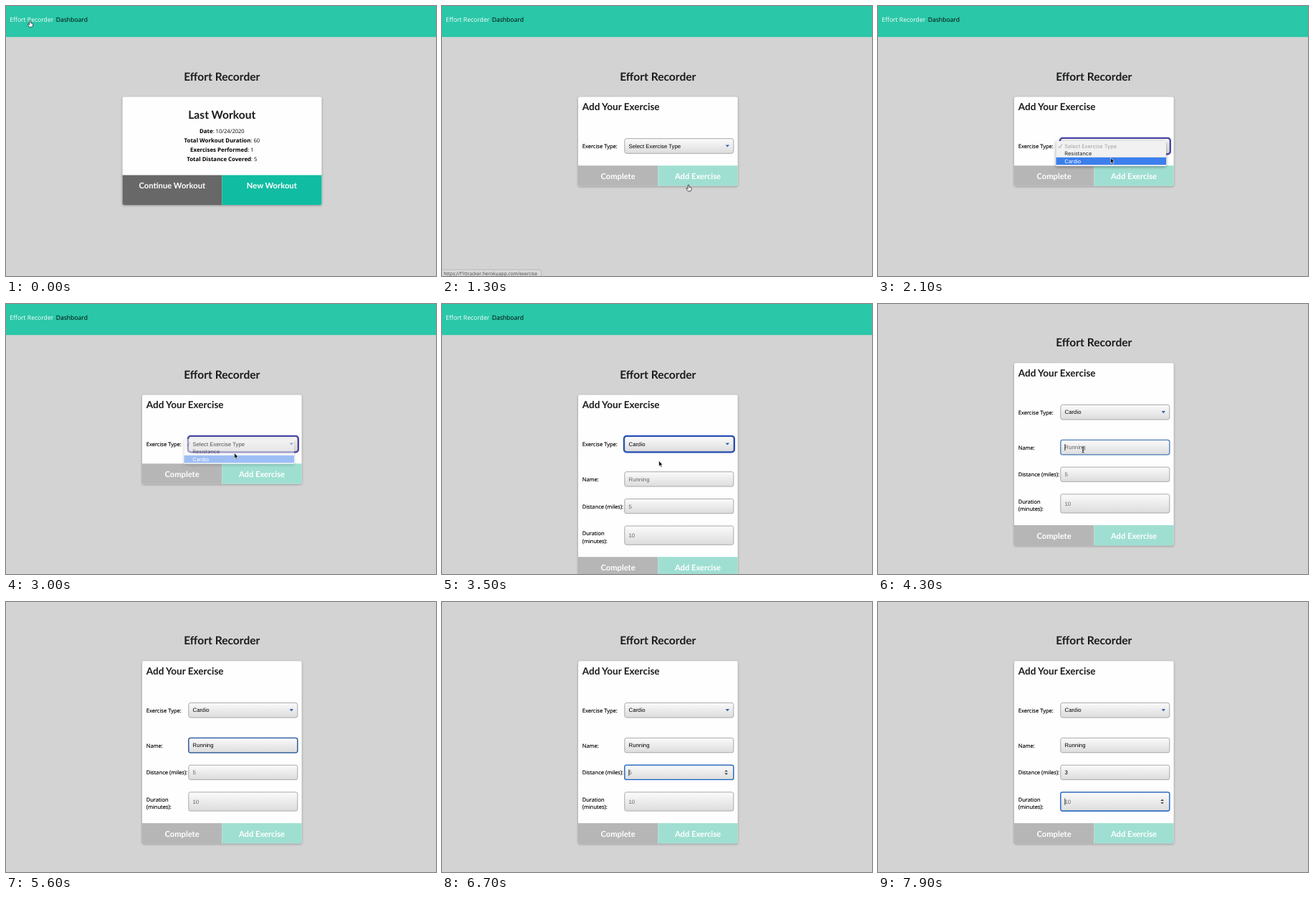
Write an HTML page that moves like this. It is 600 px wide and 376 px high and loops after 8 s.

```html
<!DOCTYPE html>
<html lang="en">
<head>
<meta charset="utf-8">
<title>Workout form</title>
<style>
html, body { margin: 0; width: 100%; height: 100%; overflow: hidden; background: #d3d3d3; }
svg { display: block; width: 600px; height: 376px; text-rendering: geometricPrecision; }
text { font: 7.55px "Open Sans", "Noto Sans", sans-serif; fill: #000; white-space: pre; }
.label { stroke: #000; stroke-width: .15; }
.mid { text-anchor: middle; }
.nav { font-size: 8.6px; }
.head { font: 700 15.6px Lato, sans-serif; fill: #1b1c1d; }
.sub { font-size: 13.55px; }
.btn { font: 700 11.2px Lato, sans-serif; fill: #fff; text-anchor: middle; }
.input { font: 7.8px "Liberation Sans", Arial, sans-serif; fill: #000; }
.input.hint { fill: #666; }
.menu { font: 7.4px Inter, "Liberation Sans", sans-serif; fill: #222; }
.status { font-size: 6.65px; fill: #444; }
.strong { font-weight: 700; font-size: 7.9px; }
.card { fill: #fefefe; filter: drop-shadow(0 1px 1.5px #0005); }
.field { fill: url(#shade); stroke: #a9a9a9; }
.ring { fill: none; }
</style>
</head>
<body>
<svg viewBox="0 0 600 376">
  <defs>
    <linearGradient id="shade" x2="0" y2="1">
      <stop stop-color="#fbfbfb"/><stop offset="1" stop-color="#dcdcdc"/>
    </linearGradient>
  </defs>
  <rect width="600" height="376" fill="#d3d3d3"/>
  <g id="page">
    <rect width="600" height="43.2" fill="#2ac7a8"/>
    <text class="nav" x="5.3" y="22.3" style="fill:#fff">Effort Recorder</text>
    <text class="nav" x="69.7" y="22.3">Dashboard</text>
    <text class="head mid" x="301.3" y="103.7">Effort Recorder</text>

    <g id="home">
      <rect class="card" x="162.5" y="126.5" width="278" height="150.5" rx="2.5"/>
      <text class="head mid" x="301.3" y="156.7">Last Workout</text>
      <g id="stats"></g>
      <path d="M162.5 235.5H301.3V277H165q-2.5 0-2.5-2.5z" fill="#686868"/>
      <path d="M301.3 235.5H440.5V274.5q0 2.5-2.5 2.5H301.3z" fill="#10bda2"/>
      <text class="btn" x="231.8" y="254.3">Continue Workout</text>
      <text class="btn" x="370.8" y="254.3">New Workout</text>
    </g>

    <g id="form">
      <rect id="sheet" class="card" x="190" y="126.5" width="222.7" height="124" rx="2.5"/>
      <text class="head sub" x="195.7" y="145.3">Add Your Exercise</text>
      <text class="label" x="195.7" y="198.2">Exercise Type:</text>
      <rect class="field" x="254.8" y="184.7" width="152" height="20.6" rx="3"/>
      <text id="choice" class="input" x="260.5" y="197.6"></text>
      <path d="M395.6 193.4h5.4l-2.7 3.2z" fill="#2b62b0"/>
      <rect id="selectRing" class="ring" x="253.9" y="183.9" width="154" height="22.4" rx="3.5" stroke-width="2.2"/>
      <g id="cardio">
        <text class="label" x="195.7" y="247">Name:</text>
        <text class="label" x="195.7" y="284.8">Distance (miles):</text>
        <text class="label" x="195.7" y="322.3">Duration</text>
        <text class="label" x="195.7" y="332.8">(minutes):</text>
        <g id="fields"></g>
      </g>
      <g id="buttons">
        <path d="M190 222.2H301.4V250.5H192.5q-2.5 0-2.5-2.5z" fill="#b6b6b6"/>
        <path d="M301.4 222.2H412.7V248q0 2.5-2.5 2.5H301.4z" fill="#9fdfd2"/>
        <text class="btn" x="245.6" y="241.2">Complete</text>
        <text class="btn" x="357" y="241.2">Add Exercise</text>
      </g>
      <g id="menu">
        <rect x="248.5" y="188" width="153.5" height="35" rx="1" fill="#f1f1f1" style="filter:drop-shadow(0 1.5px 2px #0006)"/>
        <rect x="248.5" y="210.8" width="153.5" height="10.4" fill="#3c7fec"/>
        <path d="M251.8 195.4l1.8 2.2 3.2-5" fill="none" stroke="#999" stroke-width=".9"/>
        <text class="menu" x="260.3" y="197.8" style="fill:#a2a2a2">Select Exercise Type</text>
        <text class="menu" x="260.3" y="208.3">Resistance</text>
        <text class="menu" x="260.3" y="218.8" style="fill:#fff">Cardio</text>
      </g>
    </g>
  </g>
  <g id="status">
    <path d="M-1 377V367.2H136q2.5 0 2.5 2.5V377z" fill="#dadada" stroke="#b4b4b4" stroke-width=".8"/>
    <text class="status" x="2.3" y="374.6">https://f1ttracker.herokuapp.com/exercise</text>
  </g>
  <g id="pointer">
    <path id="hand" fill="#fff" stroke="#222" stroke-width=".8" d="M-.9.8a.9.9 0 0 1 1.8 0V3.2l2.5.6q1 .3.8 1.3l-.5 2.8q-.2.9-1 .9H-.4q-.6 0-1-.6L-3.1 5.6q-.4-.9.4-1.1.6-.1 1 .5l.8.8z"/>
    <path id="arrow" fill="#000" stroke="#fff" stroke-width=".6" d="M0 0V7.6L1.7 6 2.9 8.8 4.2 8.2 3 5.5H5.4z"/>
    <path id="beam" fill="none" stroke="#222" stroke-width=".9" d="M-1.6-4Q0-4 0-3Q0-4 1.6-4M0-3V3M-1.6 4Q0 4 0 3Q0 4 1.6 4M-1 .8H1"/>
  </g>
</svg>
<script>
const $ = id => document.getElementById(id);
const show = (el, on) => el.style.display = on ? "" : "none";
const LOOP = 8000, STEP = 100, SCROLL = 44.3;

$("stats").innerHTML = [
  ["Date", "10/24/2020"], ["Total Workout Duration", "60"],
  ["Exercises Performed", "1"], ["Total Distance Covered", "5"]
].map(([k, v], i) =>
  `<text class="mid" x="301.3" y="${176.5 + i * 13.3}"><tspan class="strong">${k}</tspan>: ${v}</text>`).join("");

// Each field has focus from `from` to `to`; one letter is typed per step from `type` on.
const fields = [
  { y: 233.7, h: 20.4, base: 246.6, hint: "Running", value: "Running", from: 4200, type: 4900, to: 6500,
    blink: [[4200, 4700], [4900, 5600], [5800, 6300]] },
  { y: 271.5, h: 20.2, base: 284.7, hint: "5", value: "3", from: 6500, type: 7200, to: 7700, spin: true,
    blink: [[6500, 7000], [7200, 7500]] },
  { y: 309.1, h: 26.2, base: 325, hint: "10", value: "", from: 7700, type: 9000, to: 9000, spin: true,
    blink: [[7700, 8000]] }
];

$("fields").innerHTML = fields.map(f => {
  const box = `x="254.8" y="${f.y}" width="152" height="${f.h}" rx="2.5"`, c = f.y + f.h / 2;
  return `<g><rect class="field" ${box}/><text class="input" x="260.5" y="${f.base}"></text>
    <rect class="ring" ${box} stroke-width="1.3"/>
    <rect y="${f.base - 7.2}" width=".8" height="9" fill="#111"/>
    <path d="M394.2 ${c - 1}h4.8l-2.4-2.4zM394.2 ${c + 1}h4.8l-2.4 2.4z" fill="#444"/></g>`;
}).join("");
fields.forEach((f, i) => [, f.text, f.ring, f.caret, f.arrows] = $("fields").children[i].children);

// Pointer stops: time, x, y
const stops = [
  [0, 33.5, 20.5], [200, 361, 245.5], [600, 361, 245.5], [1100, 344, 249], [1400, 344, 249],
  [1800, 327, 195], [2100, 324.5, 211.5], [2600, 322, 212], [3000, 318.7, 207.5],
  [3300, 315, 210], [3800, 284, 231], [4100, 286, 203], [8000, 286, 203]
];

function pointerAt(t) {
  const i = stops.findIndex(s => s[0] > t), [a, b] = [stops[i - 1], stops[i]];
  const k = (t - a[0]) / (b[0] - a[0]);
  return [a[1] + (b[1] - a[1]) * k, a[2] + (b[2] - a[2]) * k];
}

function drawField(f, t) {
  const focused = t >= f.from && t < f.to;
  const typed = f.value.slice(0, Math.max(0, (t - f.type) / STEP + 1));
  f.text.textContent = typed || f.hint;
  f.text.classList.toggle("hint", !typed);
  show(f.ring, focused);
  f.ring.style.stroke = t - f.from < 400 ? "#1b66c6" : "#22569a";
  f.ring.style.opacity = Math.min(1, (t - f.from + STEP) / 300);
  show(f.caret, focused && f.blink.some(([on, off]) => t >= on && t < off));
  f.caret.setAttribute("x", 260.5 + (typed ? f.text.getComputedTextLength() + .3 : 0));
  show(f.arrows, f.spin && focused);
}

function draw(t) {
  const onForm = t >= 900, chosen = t >= 3100;
  const u = Math.min(1, Math.max(0, (t - 3560) / 550));
  $("page").setAttribute("transform", `translate(0 ${-SCROLL * u * u * (3 - 2 * u)})`);

  show($("home"), !onForm);
  show($("form"), onForm);
  show($("status"), t >= 600 && t < 1500);
  show($("cardio"), chosen);
  $("sheet").setAttribute("height", chosen ? 254 : 124);
  $("buttons").setAttribute("transform", `translate(0 ${chosen ? 130 : 0})`);

  $("choice").textContent = chosen ? "Cardio" : "Select Exercise Type";
  show($("selectRing"), t >= 1800 && t < 4200);
  $("selectRing").style.stroke = chosen ? "#2b50b6" : "#4a48a6";
  show($("menu"), t >= 1800 && t < 3200);
  $("menu").style.opacity = t < 2900 ? 1 : Math.max(0, .8 - (t - 2900) / 330);

  fields.forEach(f => drawField(f, t));

  const kind = t < 1600 ? "hand" : t < 3600 ? "arrow" : "beam";
  ["hand", "arrow", "beam"].forEach(id => show($(id), id === kind));
  show($("pointer"), t < 4900);
  $("pointer").setAttribute("transform", `translate(${pointerAt(t)})`);
}

const start = performance.now();
function tick() {
  const t = (performance.now() - start) % LOOP;
  draw(Math.floor(t / STEP) * STEP);
  requestAnimationFrame(tick);
}
tick();
</script>
</body>
</html>
```
